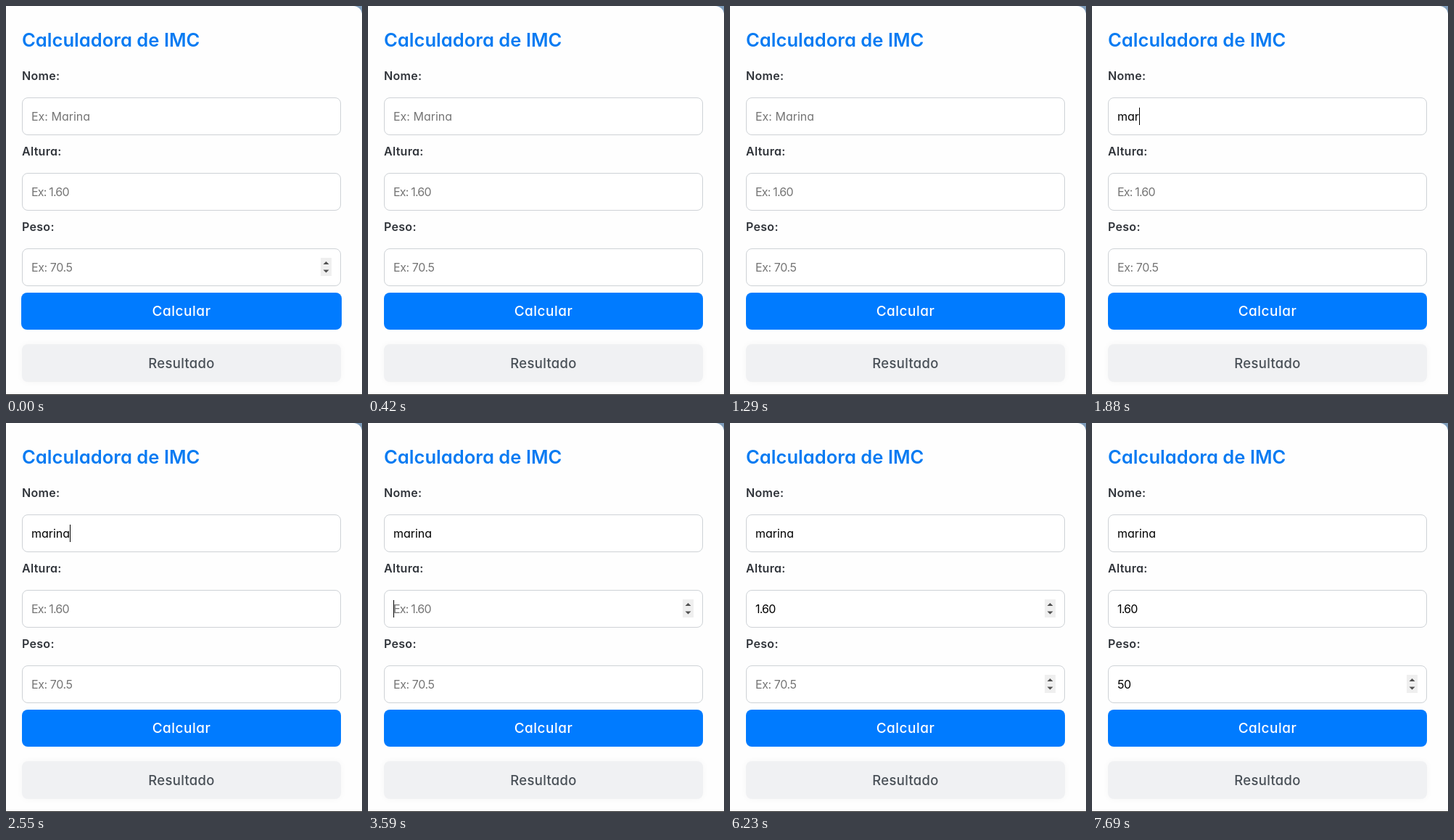
Recreate the animation shown at these times as an HTML page. Size 491 by 536 pixels, loop 7990 ms.

```html
<!DOCTYPE html>
<html lang="pt-BR">
<head>
<meta charset="utf-8">
<title>Calculadora de IMC</title>
<style>
  html, body { margin: 0; width: 100%; height: 100%; overflow: hidden; }
  body { background: #7f9dbb; font: 16px Inter, "Open Sans", sans-serif; font-feature-settings: "cv11"; }
  #stage { position: relative; width: 491px; height: 536px; overflow: hidden; }
  #card { position: absolute; inset: 0 0 1px; background: #fefefe; border-top-right-radius: 12px; }
  #edge { position: absolute; inset: 535px 0 0; background: #222; }
  h1, label, .field, .bar { position: absolute; left: 22px; margin: 0; white-space: pre; box-sizing: border-box; }
  h1 { top: 31px; font-size: 25.6px; line-height: 32px; font-weight: 600; color: #087bf2; }
  label { line-height: 24px; font-weight: 600; letter-spacing: .3px; color: #30343a; }
  .field { width: 440px; height: 52px; padding-left: 12px; border: 1px solid #ced2d6; border-radius: 8px;
    display: flex; align-items: center; line-height: 24px; background: #fff; }
  .value { color: #000; }
  .hint { color: #757575; }
  .caret { width: 1px; height: 24px; margin-right: -1px; background: #000; }
  .spin { position: absolute; left: 411px; top: 12px; width: 15px; height: 25px; background: #efefef; }
  .spin path { fill: #505050; }
  .bar { width: 440px; height: 51px; line-height: 51px; border-radius: 8px; text-align: center; font-weight: 500; }
  #calc { top: 395px; background: #007bff; color: #fff; font-size: 19px; letter-spacing: .5px; }
  #result { top: 466px; height: 52px; line-height: 52px; background: #f0f1f3; color: #495057;
    font-size: 18.5px; letter-spacing: .3px; box-shadow: 0 0 10px rgba(0, 0, 0, .04); }
</style>
</head>
<body>
<div id="stage">
  <div id="card"></div>
  <div id="edge"></div>
  <h1>Calculadora de IMC</h1>
  <div id="form"></div>
  <div class="bar" id="calc">Calcular</div>
  <div class="bar" id="result">Resultado</div>
</div>
<script>
const LOOP = 7990;

// keys: when each character lands; caret and spin: [from, to) spans of visibility
const fields = [
  { label: 'Nome:', hint: 'Ex: Marina', text: 'marina', spacing: 0,
    keys: [1590, 1790, 1880, 2080, 2170, 2360],
    caret: [[800, 1290], [1590, 2860], [3360, 3590]], spin: [] },
  { label: 'Altura:', hint: 'Ex: 1.60', text: '1.60', spacing: -.8,
    keys: [4260, 4750, 5060, 5260],
    caret: [[3590, 4050], [4260, 5740], [6310, 6400]], spin: [[210, 310], [2920, 6400]] },
  { label: 'Peso:', hint: 'Ex: 70.5', text: '50', spacing: -.4,
    keys: [7090, 7190],
    caret: [[6400, 6890], [7090, 7690]], spin: [[0, 210], [6130, LOOP]] }
];

const form = document.getElementById('form');
const button = document.getElementById('calc');

function add(parent, tag, className, text = '') {
  const el = document.createElement(tag);
  el.className = className;
  el.textContent = text;
  return parent.appendChild(el);
}

fields.forEach((field, i) => {
  const top = 126 + 104 * i;
  add(form, 'label', '', field.label).style.top = top - 42 + 'px';
  const box = add(form, 'div', 'field');
  box.style.top = top + 'px';
  box.style.letterSpacing = field.spacing + 'px';
  field.valueEl = add(box, 'span', 'value');
  field.caretEl = add(box, 'span', 'caret');
  field.hintEl = add(box, 'span', 'hint', field.hint);
  field.spinEl = add(box, 'span', 'spin');
  field.spinEl.innerHTML = '<svg width="15" height="25" style="display:block">' +
    '<path d="M3.5 9l4-4 4 4zM3.5 16.500h8l-4 4z"/></svg>';
});

const within = (spans, t) => spans.some(([from, to]) => t >= from && t < to);
const show = (el, on) => { el.style.visibility = on ? 'visible' : 'hidden'; };

function draw(now) {
  const t = now % LOOP;
  for (const f of fields) {
    const typed = f.keys.filter(k => k <= t).length;
    f.valueEl.textContent = f.text.slice(0, typed);
    show(f.hintEl, !typed);
    show(f.caretEl, within(f.caret, t));
    show(f.spinEl, within(f.spin, t));
  }
  button.style.transform = t < 110 ? 'scale(1.0045)' : 'none';
}

const start = performance.now();
function tick() {
  draw(performance.now() - start);
  requestAnimationFrame(tick);
}
tick();
</script>
</body>
</html>
```
